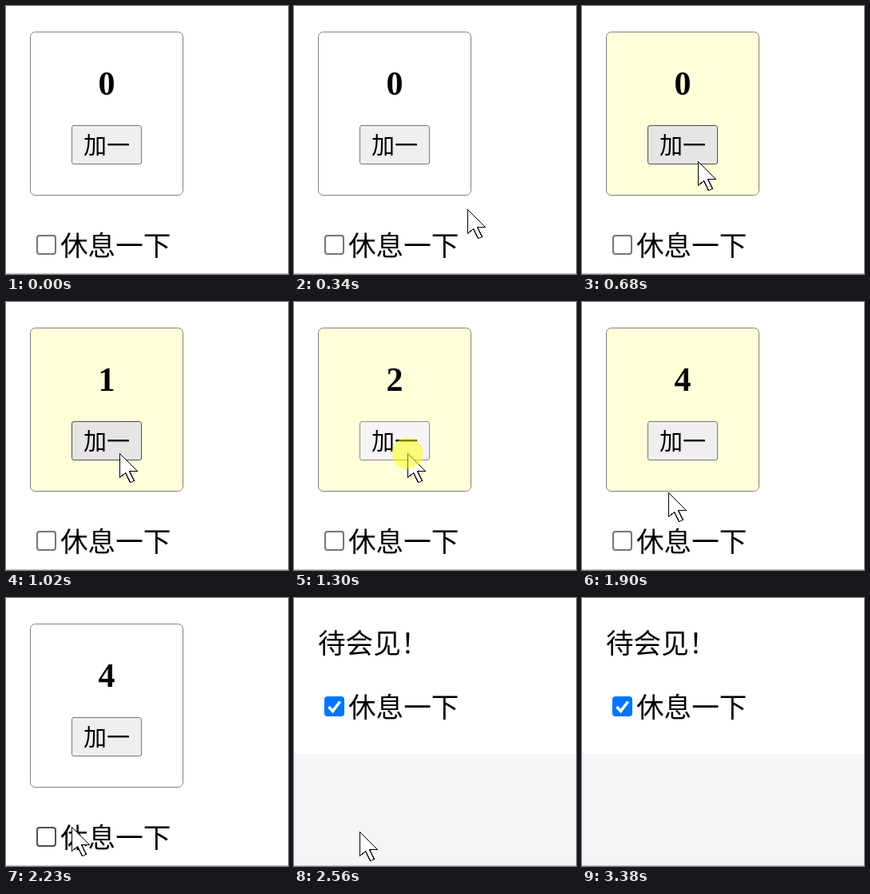
An HTML page that plays this animation: 353x335 px, repeating every 3910 ms.

```html
<!DOCTYPE html>
<html lang="zh-CN">
<head>
<meta charset="utf-8">
<title>加一</title>
<style>
  html, body { margin: 0; width: 100%; height: 100%; overflow: hidden; background: #fff; }
  svg { display: block; }
  text { font-family: "Noto Sans CJK SC", "Noto Sans CJK", sans-serif; font-size: 34.6px; font-weight: 350; fill: #000; }
  .count { font: bold 42px "Liberation Serif", serif; text-anchor: middle; }
  .label { font-size: 29px; text-anchor: middle; }
</style>
</head>
<body>
<svg width="353" height="335" viewBox="0 0 353 335">
  <g id="counter">
    <rect id="card" x="30.5" y="32.5" width="191" height="204" rx="6" stroke="#808080"/>
    <text id="count" class="count" x="126" y="111"></text>
    <rect id="button" x="82.5" y="149.5" width="87" height="48" rx="2.5"/>
    <text class="label" x="126" y="185">加一</text>
  </g>
  <g id="goodbye">
    <rect width="353" height="335" fill="#f5f6f8"/>
    <rect x="-2" y="-20" width="380" height="215" rx="8" fill="#fff"/>
    <text x="30" y="68.5">待会见！</text>
  </g>
  <g id="rest">
    <rect id="box" x="39" y="287" width="23" height="23" rx="3" stroke-width="2"/>
    <path id="tick" d="M43.5 299 L48.5 304.5 L57.5 292.5" fill="none" stroke="#fff" stroke-width="3.6"/>
    <text x="68" y="312">休息一下</text>
  </g>
  <path d="M0 334.5H353" stroke="#c0c0c0"/>
  <g id="pointer">
    <path d="M.5 .5V30.5L7.5 24.5L13.5 36.5L18.5 34.5L12.5 22.5H22.5Z" fill="#fff" stroke="#000" shape-rendering="crispEdges"/>
    <circle id="halo" r="19.5" fill="#ff0" fill-opacity=".5"/>
  </g>
</svg>
<script>
const LOOP = 3910;
const STEP = 67.4;
const $ = id => document.getElementById(id);
const set = (id, attrs) => {
  for (const name in attrs) $(id).setAttribute(name, attrs[name]);
};
const show = (id, on) => set(id, { display: on ? 'inline' : 'none' });

const linear = p => p;
const easeOut = p => 1 - (1 - p) ** 2;
const hold = p => p < 1 ? 0 : 1;

// Pointer path: step, x, y, easing on the way to that point
const path = [
  [3, 287, 312, hold], [10, 145, 194, easeOut], [11, 142, 189, hold],
  [25, 142, 189, hold], [28, 108, 238, linear], [33, 82, 286, easeOut],
  [34, 82, 292, hold], [43, 82, 292, hold],
  [46, 184, 269, linear], [49, 328, 298, linear]
];
// Presses: first step down, step of release
const presses = [[12, 14], [16, 18], [19, 21], [22, 23]];
const labelPress = [35, 38];
const SWAP = 37;

function pointerAt(step) {
  const next = path.findIndex(key => key[0] >= step);
  if (next < 0 || step < path[0][0]) return null;
  const [s1, x1, y1, ease] = path[next];
  const [s0, x0, y0] = path[Math.max(0, next - 1)];
  const p = s1 > s0 ? ease((step - s0) / (s1 - s0)) : 1;
  return { x: x0 + (x1 - x0) * p, y: y0 + (y1 - y0) * p };
}

const within = (p, left, top, right, bottom) =>
  !!p && p.x >= left && p.x <= right && p.y >= top && p.y <= bottom;

function render(time) {
  const step = Math.floor((time % LOOP) / STEP + 0.04);
  const pointer = pointerAt(step);
  const isDown = ([down, up]) => step >= down && step < up;
  const pressed = presses.some(isDown);
  const resting = step >= SWAP;

  show('counter', !resting);
  show('goodbye', resting);
  show('tick', resting);
  $('count').textContent = presses.filter(([, up]) => step >= up).length;
  set('card', { fill: within(pointer, 30, 32, 222, 238) ? '#ffffd9' : '#fff' });

  const hover = within(pointer, 82, 149, 170, 198);
  set('button', {
    fill: pressed ? '#f5f5f5' : hover ? '#e5e5e5' : '#efefef',
    stroke: pressed ? '#8d8d8d' : hover ? '#4f4f4f' : '#767676'
  });

  const labelHover = within(pointer, 38, 280, 206, 320);
  set('rest', { transform: `translate(0 ${resting ? -163 : 0})` });
  set('box', {
    fill: resting ? '#0075ff' : '#fff',
    stroke: resting ? '#0075ff' : labelHover ? '#4f4f4f' : '#767676'
  });

  show('pointer', pointer);
  show('halo', pressed || isDown(labelPress));
  if (pointer) {
    set('pointer', { transform: `translate(${Math.round(pointer.x)} ${Math.round(pointer.y)})` });
  }
}

const start = performance.now();
function loop() {
  render(performance.now() - start);
  requestAnimationFrame(loop);
}
loop();
</script>
</body>
</html>
```
